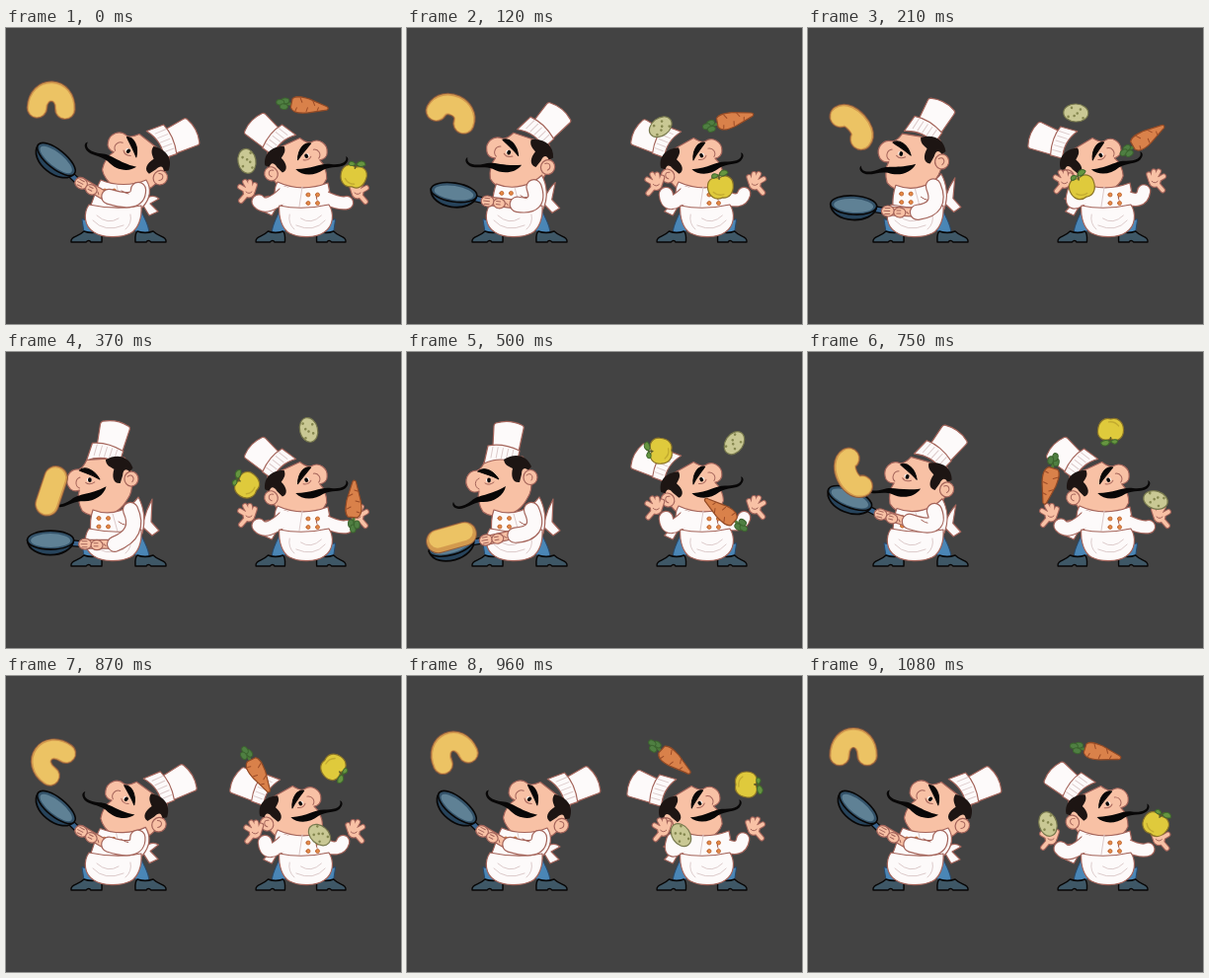
An HTML page with a canvas for the animation above (1.12 s loop, 400 by 300 pixels).

```html
<!DOCTYPE html>
<html lang="en">
<head>
<meta charset="utf-8">
<title>Juggling chefs</title>
<style>
html, body { margin: 0; width: 100%; height: 100%; overflow: hidden; background: #434343; }
canvas { display: block; width: 400px; height: 300px; }
</style>
</head>
<body>
<canvas id="stage" width="400" height="300"></canvas>
<script>
const ctx = document.getElementById('stage').getContext('2d');
const LOOP = 1120, STEPS = 27;
const LINE = '#a4645a', SKIN = '#f8c1a5', WHITE = '#fdfafa', FOLD = '#dccaca', HAIR = '#1d1513', BLACK = '#080707';

const { PI, sin, cos, abs, max, min, sqrt } = Math;
const rad = deg => deg * PI / 180;
const lerp = (a, b, t) => a + (b - a) * t;
const smooth = t => { t = max(0, min(1, t)); return t * t * (3 - 2 * t); };

function shape(d, fill, stroke, width = 1.2) {
  const p = new Path2D(d);
  if (fill) { ctx.fillStyle = fill; ctx.fill(p); }
  if (stroke) { ctx.strokeStyle = stroke; ctx.lineWidth = width; ctx.stroke(p); }
}
function oval(x, y, rx, ry, fill, stroke, width = 1.2) {
  shape(`M${x - rx} ${y}a${rx} ${ry} 0 1 0 ${2 * rx} 0a${rx} ${ry} 0 1 0 ${-2 * rx} 0Z`, fill, stroke, width);
}
function limb(d, width, fill) {
  shape(d, null, LINE, width + 2.4);
  shape(d, null, fill, width);
}
function placed(x, y, deg, draw, sx = 1, sy = 1) {
  ctx.save();
  ctx.translate(x, y);
  ctx.scale(sx, sy);
  ctx.rotate(rad(deg));
  draw();
  ctx.restore();
}
// Blend two paths of the same structure.
function mix(a, b, t) {
  const to = b.match(/-?[\d.]+/g);
  let i = 0;
  return a.replace(/-?[\d.]+/g, v => lerp(+v, +to[i++], t));
}

// The origin of the head is the ear; it looks to the left.
function head(hatTilt) {
  shape('M-46 -16C-48 -11 -50 -7 -54 -6C-64 -6 -68 5 -63 12C-61 16 -56 17 -52 15C-54 21 -52 30 -48 36C-39 43 -14 44 -3 22C3 14 3 -8 -8 -20Z', SKIN, LINE);
  shape('M-52 2C-57 4 -57 11 -52 13', null, LINE, 1);
  placed(0, 0, hatTilt, () => {
    shape('M-35 -54Q-21 -58 -9 -52Q-6 -51 -7 -48L-12 -25L-38 -31L-37 -51Q-37 -53 -35 -54Z', WHITE, LINE);
    shape('M-43 -31Q-28 -34 -11 -26L-14 -13Q-30 -21 -47 -13Z', WHITE, LINE);
    for (let i = 0; i < 5; i++) {
      const x = -38 + i * 5.2;
      shape(`M${x} ${-30 + i * .8}L${x - 2} ${-19 + i * .3}`, null, FOLD, 1);
    }
  });
  shape('M-27 -17C-16 -24 -4 -22 1 -10L-2 -6C-6 -10 -9 -8 -9 -2L-11 6C-18 7 -20 0 -18 -8C-22 -10 -26 -11 -27 -17Z', HAIR);
  oval(0, 1, 7, 7.5, SKIN, LINE);
  shape('M-4 -1C0 -5 4 0 1 4', null, LINE, 1);
  oval(-42.5, 4, 2.6, 2, WHITE);
  oval(-42, 4, 1.9, 2.4, BLACK);
  shape('M-46 7Q-42 10 -37 6', null, LINE, 1);
  shape('M-53 -5C-48 -10 -38 -7 -32 3C-40 -1 -45 -2 -53 -5Z', BLACK, BLACK, 1);
  shape('M-78 26C-76 33 -68 31 -60 25C-52 18 -42 20 -25 10C-27 20 -38 27 -50 26C-60 27 -66 34 -73 33C-78 32 -80 29 -78 26Z', BLACK);
}

const bowBack = 'M139 175Q148 167 155 173L146 178L154 186L145 190L139 180Z';
const bowUp = 'M139 172Q142 160 148 149L147 172L155 181L148 186L139 178Z';
function legs(lean) {
  shape('M77 194L79 207L95 207L102 200Z', '#4a86b6', '#26486b', 1);
  shape('M120 198L133 207L145 207C144 200 141 194 136 184Z', '#4a86b6', '#26486b', 1);
  for (const [x, side] of [[97, 1], [131, -1]]) placed(x, 206, 0, () =>
    shape('M0 11L-11 11Q-13 8 -16 11L-31 11C-32 5 -24 6 -18 0Q-10 3 -2 0C1 3 0 8 0 11Z', '#3e5766', BLACK, 1.5), side);
  shape(mix(bowBack, bowUp, lean), WHITE, LINE);
}
function apron() {
  shape('M84 179Q112 185 137 180C138 192 134 204 126 208C116 213 98 213 89 207C79 201 78 188 84 179Z', WHITE, LINE);
  shape('M88 195Q100 208 119 200M92 190Q103 200 114 193M126 189Q128 198 121 204', null, FOLD, 1);
}
function buttons(x, y) {
  for (const dx of [0, 9.5]) for (const dy of [0, 8.5]) oval(x + dx, y + dy, 2, 2, '#e58a45', '#b9602e', .8);
}

function drawPan() {
  shape('M22 3L33 4', null, BLACK, 7);
  shape('M22 3L33 4', null, '#39638c', 4.5);
  shape('M-23.5 0C-22 20 21 20 23.5 0Z', '#27445c', BLACK, 1.8);
  oval(0, 0, 23.5, 9.5, '#34536a', BLACK, 1.6);
  oval(0, .5, 20, 7, '#5f8195');
}
function drawPancake(bend, under) {
  const x = 14 + 6 * bend * (1 - bend), w = 23.5 - 3.5 * bend;
  const arc = dy => `M${-x} ${8 * bend + dy}C-14 ${-16 * bend + dy} 14 ${-16 * bend + dy} ${x} ${8 * bend + dy}`;
  shape(arc(0), null, '#8d5a3c', w + 1.4);
  shape(arc(0), null, '#d39a4e', w - .6);
  shape(arc(under / 2), null, '#ecc364', w - 2 - under);
}

// The pan sinks to catch at step 12, then swings up.
function panPose(k) {
  const rise = k < 12 ? (1 - k / 12) ** 3 : smooth((k - 12) / 9);
  const dip = Math.exp(-(((k - 12) / 2) ** 2));
  const forward = k > 12 ? 8 * sin(PI * min(1, (k - 12) / 9)) : 0;
  return { x: 45 + 6 * rise - forward, y: 191 - 58 * rise + 5 * dip, deg: 2 + 37 * rise ** 2 - 18 * dip };
}

// The pancake rests in the pan for steps 12 to 16 and is tossed in a parabola otherwise.
function pancakePose(k, pan) {
  const rest = { x: pan.x, y: pan.y - 8, deg: pan.deg + 180, bend: 0, under: 4 };
  if (k >= 12 && k <= 16) return rest;
  const time = k < 12 ? k + STEPS : k, off = smooth((time - 16) / 4);
  const v = time < 26 ? (time - 26) / 10 : (time - 26) / 13;
  const turn = Math.sign(v) * abs(v) ** 1.6;
  return {
    x: lerp(rest.x, 46, off),
    y: lerp(rest.y, 72.5 + .62 * (time - 25.5) ** 2, off),
    deg: 360 + 165 * turn,
    bend: off * max(0, 1 - 2 * max(0, turn)),
    under: 1
  };
}

function leftChef(k) {
  const back = k < 12 ? (1 - k / 12) ** 2 : smooth((k - 14) / 8), lean = 1 - back * back;
  const pan = panPose(k), cake = pancakePose(k, pan);
  legs(lean);
  placed(125 + 32 * back, 126 + 25 * back, 44 * back, () => head(13 * sqrt(back)));
  shape(mix('M96 154C92 160 90 170 85 182L138 182C147 172 147 162 142 154C128 160 110 160 96 154Z',
    'M88 160C85 168 85 176 86 184L138 184C141 172 140 158 134 147C126 158 108 168 88 160Z', lean), WHITE, LINE);
  shape(mix('M112 159L116 178', 'M108 164L113 182', lean), null, FOLD, 1);
  buttons(100 - 6 * lean, 165 + 3.5 * lean);
  apron();
  placed(pan.x, pan.y, pan.deg, drawPan);
  const a = rad(pan.deg), reach = .7 * pan.deg;
  const hx = pan.x + 31 * cos(a) - 4 * sin(a), hy = pan.y + 31 * sin(a) + 4 * cos(a);
  const wx = hx + 29 * cos(rad(reach)), wy = hy + 29 * sin(rad(reach));
  limb(`M${hx + 3} ${hy}L${wx} ${wy}`, 7.5, SKIN);
  placed(hx, hy, reach, () => {
    oval(4, 0, 6.5, 5.5, SKIN, LINE);
    oval(16, 1, 6, 5, SKIN, LINE);
    shape('M1 -3L6 -3M0 0L6 0M1 3L6 3M13 -1L17 -1M13 2L17 2M23 0L25 2', null, LINE, 1);
  });
  limb(mix(`M134 164Q134 180 ${wx + 6} ${wy + 2}`, `M126 160Q137 184 ${wx + 5} ${wy}`, lean), 14, WHITE);
  shape(mix('M117 165Q122 168 124 168', 'M114 172Q118 175 120 175', lean), null, LINE, 1);
  placed(cake.x, cake.y, cake.deg, () => drawPancake(cake.bend, cake.under));
}

function hand(x, y, side) {
  placed(x, y, 0, () => {
    const fingers = 'M2 4L8 11M2 1L9 -3M0 -1L4 -8M-2 0L-1 -8M-4 1L-6 -5';
    shape(fingers, null, LINE, 6);
    oval(0, 2, 6, 6, SKIN, LINE);
    shape(fingers, null, SKIN, 3.8);
    shape('M-3 2Q0 5 3 2', null, LINE, 1);
  }, side);
}
function drawCarrot() {
  shape('M-18 0L-25 -1', null, '#4c7a38', 3);
  for (const [x, y] of [[-24, -3], [-29, -1], [-25, 3]]) oval(x, y, 4, 2.8, '#4f7f42', '#3c642f', 1);
  shape('M-17 -6C-13 -10 -6 -8 0 -7L18 -1C21 0 20 3 17 3L0 7C-10 9 -16 8 -18 3Z', '#d9814a', '#934a25', 1.2);
  shape('M-9 -7L-7 -3M-2 6L-1 2M4 -5L6 -1M9 4L10 1M-13 6L-12 3', null, '#9c4c28', 1);
}
function drawApple() {
  shape('M0 -9C8 -13 14 -7 13 0C12 9 6 13 0 11C-7 13 -13 8 -13 0C-13 -8 -7 -13 0 -9Z', '#dfca3c', '#8b7428', 1.2);
  shape('M-8 4Q-4 9 2 8', null, '#c3ab30', 1.4);
  shape('M0 -8Q0 -12 2 -14', null, '#5b5a2a', 1.6);
  shape('M1 -12C3 -18 9 -17 10 -13C7 -10 3 -10 1 -12ZM0 -12C-4 -16 -7 -14 -7 -11C-5 -9 -2 -10 0 -12Z', '#669540', '#3e682c', 1);
}
function drawPotato() {
  oval(0, 0, 9, 12.5, '#c9c894', '#77784d');
  for (let i = 0; i < 6; i++) oval(5 * cos(i * 2.4), (i - 2.5) * 3, 1.3, 1.3, '#85874f');
}

// One round of the juggle: a low throw to the left hand, a high throw back, a short rest.
function juggle(p) {
  const low = (p - 9) / 8, high = (p - 17) / 18;
  if (p < 17) return [lerp(352, 243, smooth(low)), 150 + 12 * sin(PI * low)];
  return [lerp(243, 352, smooth(high)), 150 - max(0, 288 * high * (1 - high))];
}
const items = [
  { draw: drawPotato, shift: 18, spin: u => -10 + 360 * u + 65 * sin(PI * u) },
  { draw: drawApple, shift: 9, spin: u => 10 - 360 * u + 58 * sin(PI * u) },
  { draw: drawCarrot, shift: 0, spin: u => 5 - 360 * u + 28 * sin(2 * PI * u) }
];

function rightChef(k) {
  const back = (1 - cos(k / 9 * 2 * PI)) / 2;
  const lx = 246 + 15 * back ** 3, ly = 164 - 10 * back, rx = 356 - 5 * back, ry = 165 - 12 * back;
  const mirrored = draw => placed(406.5, 0, 0, draw, -.947);
  mirrored(() => legs(0));
  placed(268 - 6 * back, 147 + 3 * back, 31 + 6 * back, () => head(10 + 15 * back), -.95, .95);
  shape('M275 156C269 166 273 178 279 184L328 184C330 175 328 166 326 157C310 163 292 164 275 156Z', WHITE, LINE);
  shape('M300 161L297 181', null, FOLD, 1);
  hand(lx, ly, -1);
  hand(rx, ry, 1);
  limb(`M282 168Q264 185 ${lx + 10} ${ly + 12}`, 13, WHITE);
  limb(`M321 171Q338 179 ${rx - 11} ${ry + 12}`, 12, WHITE);
  shape('M277 159L291 163L290 178L279 179Z', WHITE);
  shape('M314 163L326 163L326 179L316 179Z', WHITE);
  mirrored(apron);
  buttons(306, 169);
  for (const { draw, shift, spin } of items) {
    const p = 9 + (k + shift + STEPS - 9) % STEPS;
    placed(...juggle(p), spin(k / STEPS), draw);
  }
}

// The picture steps at 24 per second, on times rounded to 10 ms.
const starts = Array.from({ length: STEPS }, (_, i) => Math.ceil(i * 100 / 24 - .5) * 10);
ctx.lineCap = ctx.lineJoin = 'round';
function frame() {
  const t = performance.now() % LOOP;
  const k = starts.filter(s => s <= t).length - 1;
  ctx.fillStyle = '#434343';
  ctx.fillRect(0, 0, 400, 300);
  leftChef(k);
  rightChef(k);
  requestAnimationFrame(frame);
}
frame();
</script>
</body>
</html>
```
